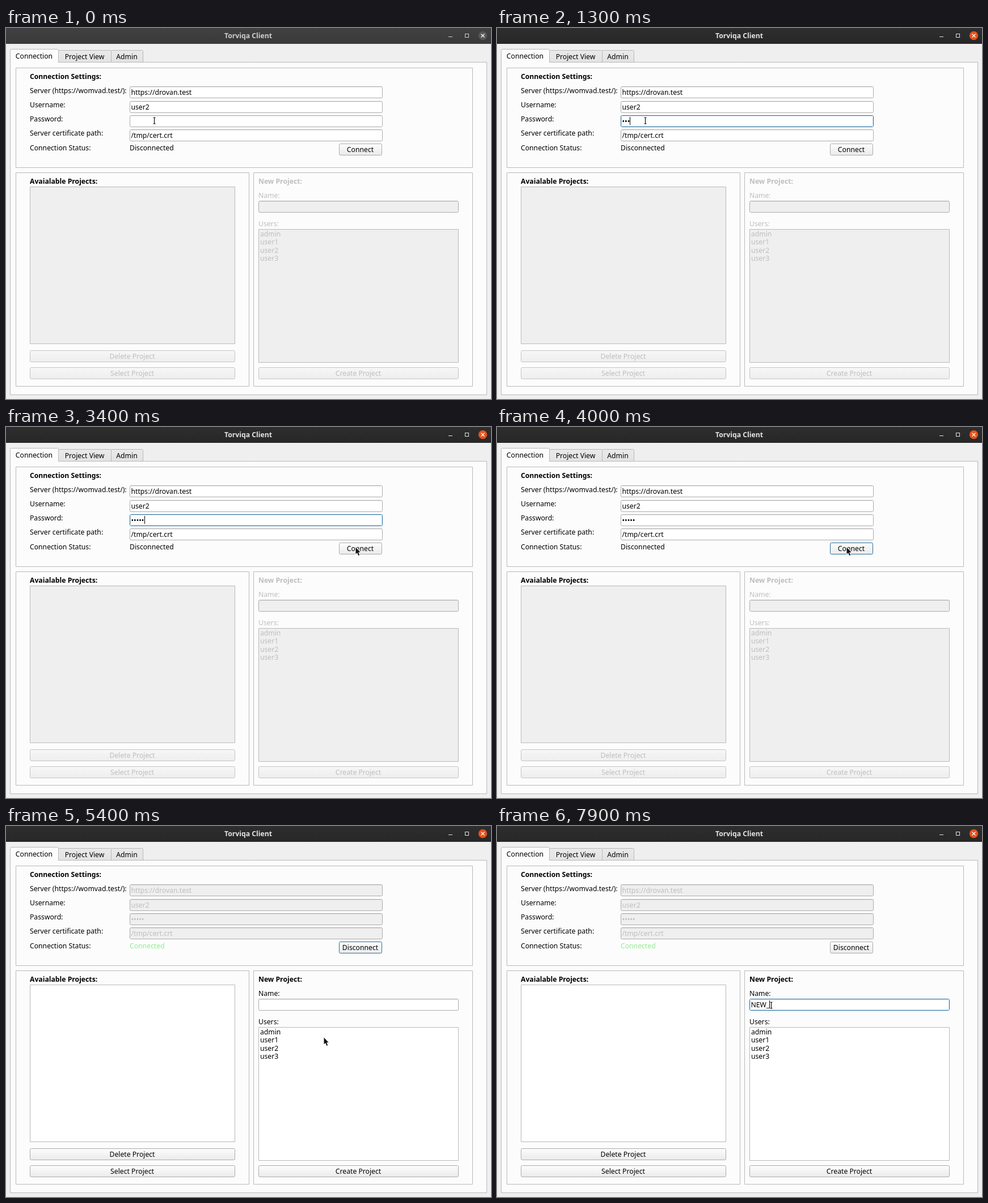
Write an HTML page with a canvas that moves like this. It is 855 px wide and 655 px high and loops after 8 s.

```html
<!DOCTYPE html>
<html lang="en">
<head>
<meta charset="utf-8">
<title>Client</title>
<style>
html, body { margin: 0; width: 100%; height: 100%; overflow: hidden; background: #efefef; }
canvas { display: block; }
</style>
</head>
<body>
<canvas id="stage" width="855" height="655"></canvas>
<script>
const ctx = document.getElementById('stage').getContext('2d');
const LOOP = 8000;
const FONT = '12.2px "Noto Sans", "Open Sans", sans-serif';
const BLACK = '#000', GREY = '#bebebe', PANE = '#fcfcfc', EDGE = '#b9b9b9', OUTLINE = '#ababab', FOCUS = '#266f9e';

// Times at which things happen, in ms
const ACTIVE = 300, PRESS = 3800, RELEASE = 4000, ONLINE = 4300, NAME_FOCUS = 6700;
const PASS_KEYS = [1100, 1200, 1300, 1500, 1800];
const NAME_KEYS = [7200, 7400, 7600, 7900];
const CARET_OFF = [[800, 1100], [2700, 3200]];

// Pointer: time, x, y, and 1 where it is a text beam
const POINTER = [
  [0, 261, 163, 1], [2400, 283, 163, 1],
  [2700, 372, 172, 1], [2800, 530, 206, 0], [2900, 631, 225, 0], [3400, 616, 212, 0],
  [5000, 624, 218, 0], [5100, 641, 243, 0], [5200, 632, 285, 0], [5300, 602, 334, 0],
  [5400, 560, 373, 0], [5500, 522, 392, 0], [5600, 498, 388, 0], [5700, 488, 378, 0],
  [6200, 487, 360, 0], [6300, 485, 334, 0], [6400, 483, 316, 1]
];

const count = (times, t) => times.filter(k => t >= k).length;

function text(str, x, y, color = BLACK, { bold = false, center = false } = {}) {
  ctx.font = (bold ? 'bold ' : '') + FONT;
  ctx.textAlign = center ? 'center' : 'left';
  ctx.fillStyle = color;
  ctx.fillText(str, x, y);
}

function box(x0, y0, x1, y1, fill, edge, radius = 0) {
  ctx.beginPath();
  ctx.roundRect(x0 + .5, y0 + .5, x1 - x0, y1 - y0, radius);
  ctx.fillStyle = fill;
  ctx.fill();
  ctx.strokeStyle = edge;
  ctx.lineWidth = 1;
  ctx.stroke();
}

function shade(y0, y1, top, bottom) {
  const g = ctx.createLinearGradient(0, y0, 0, y1);
  g.addColorStop(0, top);
  g.addColorStop(1, bottom);
  return g;
}

function field(x0, y0, x1, y1, str, { enabled = true, focus = false, caret = false } = {}) {
  box(x0, y0, x1, y1, enabled ? '#fff' : '#efefef', focus ? FOCUS : OUTLINE, 2);
  if (focus) {
    ctx.strokeStyle = '#dce8f0';
    ctx.strokeRect(x0 + 1.5, y0 + 1.5, x1 - x0 - 2, y1 - y0 - 2);
  } else {
    ctx.fillStyle = 'rgba(0, 0, 0, .07)';
    ctx.fillRect(x0 + 2, y0 + 1, x1 - x0 - 3, 1);
  }
  text(str, x0 + 2.5, y0 + 15, enabled ? BLACK : GREY);
  if (caret) {
    ctx.fillStyle = BLACK;
    ctx.fillRect(x0 + 3 + Math.round(ctx.measureText(str).width - .4), y0 + 3, 1, 14);
  }
}

function button(x0, y0, x1, y1, str, { enabled = true, focus = false, pressed = false } = {}) {
  const fill = pressed ? '#d9d9d9'
    : enabled ? shade(y0, y1, '#fdfdfd', '#ebebeb') : shade(y0, y1, '#f7f7f7', '#eeeeee');
  box(x0, y0, x1, y1, fill, focus ? FOCUS : enabled ? OUTLINE : '#c4c4c4', 2);
  text(str, (x0 + x1) / 2, y0 + 15, enabled ? BLACK : GREY, { center: true });
}

function titleBar(active) {
  ctx.fillStyle = active ? shade(0, 28, '#2e2e2e', '#272727') : shade(0, 28, '#414141', '#393939');
  ctx.fillRect(0, 0, 855, 28);
  const ink = active ? '#e4e4e4' : '#cfcfcf';
  text('Torviqa Client', 427, 18, ink, { bold: true, center: true });
  ctx.fillStyle = ink;
  ctx.fillRect(780, 15, 7, 1);
  ctx.strokeStyle = ink;
  ctx.lineWidth = 1;
  ctx.strokeRect(809.5, 10.5, 6, 6);
  ctx.fillStyle = active ? '#e5521c' : '#575757';
  ctx.beginPath();
  ctx.arc(840.5, 13.5, 7.7, 0, 7);
  ctx.fill();
  ctx.strokeStyle = '#fff';
  ctx.lineWidth = 1.2;
  ctx.beginPath();
  ctx.moveTo(837.5, 10.5); ctx.lineTo(843.5, 16.5);
  ctx.moveTo(843.5, 10.5); ctx.lineTo(837.5, 16.5);
  ctx.stroke();
}

function tabs() {
  box(92, 39, 185, 63, shade(39, 60, '#eaeaea', '#e3e3e3'), EDGE, 2);
  box(185, 39, 241, 63, shade(39, 60, '#eaeaea', '#e3e3e3'), EDGE, 2);
  box(7, 60, 847, 647, PANE, EDGE);
  box(7, 37, 92, 64, PANE, EDGE, 2);
  ctx.fillStyle = PANE;
  ctx.fillRect(8, 60, 84, 6);
  ctx.fillRect(92, 61, 1, 5);
  text('Connection', 49.5, 54, BLACK, { center: true });
  text('Project View', 138.5, 55, BLACK, { center: true });
  text('Admin', 213, 55, BLACK, { center: true });
}

function connection(t, online) {
  box(17, 70, 822, 246, PANE, EDGE);
  text('Connection Settings:', 42, 90, BLACK, { bold: true });
  const labels = ['Server (https://womvad.test/):', 'Username:', 'Password:', 'Server certificate path:', 'Connection Status:'];
  const baselines = [115, 140, 165, 190, 216];
  labels.forEach((label, i) => text(label, 42, baselines[i]));

  const enabled = !online;
  const focus = t >= ACTIVE && t < PRESS;
  const caret = focus && !CARET_OFF.some(([a, b]) => t >= a && t < b);
  field(218, 103, 663, 123, 'https://drovan.test', { enabled });
  field(218, 129, 663, 149, 'user2', { enabled });
  field(218, 154, 663, 174, '•'.repeat(count(PASS_KEYS, t)), { enabled, focus, caret });
  field(218, 179, 663, 199, '/tmp/cert.crt', { enabled });
  text(online ? 'Connected' : 'Disconnected', 218, 216, online ? '#90ee90' : BLACK);
  button(587, 204, 662, 224, online ? 'Disconnect' : 'Connect', {
    focus: t >= PRESS && t < NAME_FOCUS,
    pressed: t >= PRESS && t < RELEASE
  });
}

function projects(t, enabled) {
  const ink = enabled ? BLACK : GREY, paper = enabled ? '#fff' : '#efefef';
  box(17, 255, 428, 632, PANE, EDGE);
  text('Avaialable Projects:', 42, 275, BLACK, { bold: true });
  box(42, 280, 403, 557, paper, EDGE);
  button(42, 569, 403, 589, 'Delete Project', { enabled });
  button(42, 599, 403, 619, 'Select Project', { enabled });

  box(436, 255, 822, 632, PANE, EDGE);
  text('New Project:', 445, 275, ink, { bold: true });
  text('Name:', 445, 300, ink);
  const focus = t >= NAME_FOCUS;
  field(445, 305, 797, 325, 'NEW_'.slice(0, count(NAME_KEYS, t)), { enabled, focus, caret: focus });
  text('Users:', 445, 350, ink);
  box(445, 355, 797, 590, paper, EDGE);
  ['admin', 'user1', 'user2', 'user3'].forEach((name, i) => text(name, 448, Math.round(368 + i * 14.3), ink));
  button(445, 599, 797, 619, 'Create Project', { enabled });
}

const arrow = new Path2D('M0 0V11.8L2.7 9.4L4.8 14.4L6.7 13.6L4.6 8.7H8.2Z');
const beam = new Path2D('M-2 -5.5H-1Q0 -5.5 0 -4.5Q0 -5.5 1 -5.5H2M0 -5V5M-2 5.5H-1Q0 5.5 0 4.5Q0 5.5 1 5.5H2');

function pointer(t) {
  const [, x, y, isBeam] = POINTER.findLast(p => t >= p[0]);
  ctx.save();
  ctx.translate(x + .5, y + .5);
  if (isBeam) {
    ctx.strokeStyle = '#fff';
    ctx.lineWidth = 2.6;
    ctx.stroke(beam);
    ctx.strokeStyle = BLACK;
    ctx.lineWidth = 1.1;
    ctx.stroke(beam);
  } else {
    ctx.strokeStyle = '#fff';
    ctx.lineWidth = 1.8;
    ctx.stroke(arrow);
    ctx.fillStyle = '#111';
    ctx.fill(arrow);
  }
  ctx.restore();
}

function draw(now) {
  const t = now % LOOP, online = t >= ONLINE;
  ctx.fillStyle = '#efefef';
  ctx.fillRect(0, 0, 855, 655);
  titleBar(t >= ACTIVE);
  tabs();
  connection(t, online);
  projects(t, online);
  pointer(t);
  requestAnimationFrame(draw);
}
requestAnimationFrame(draw);
</script>
</body>
</html>
```
